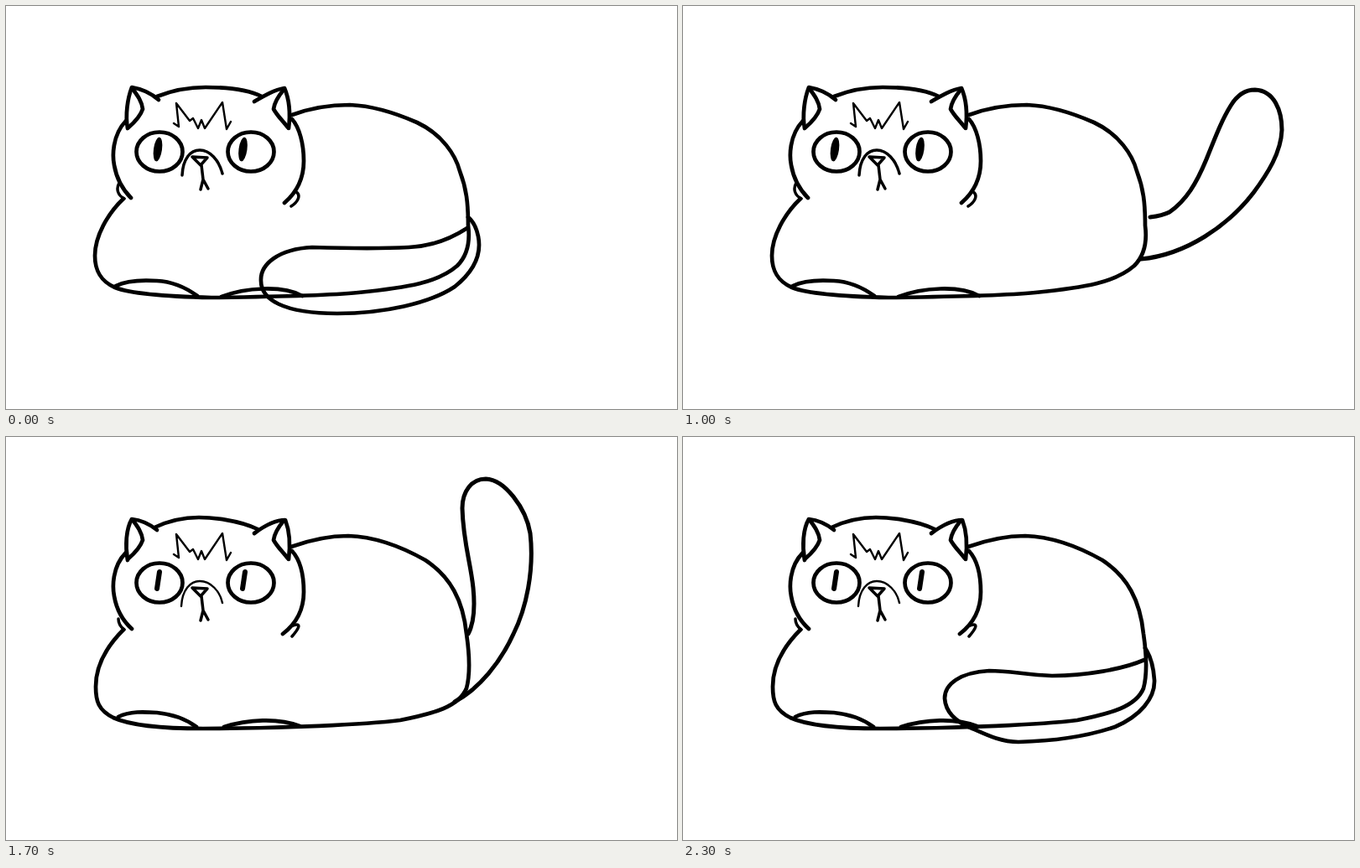
An HTML page for the animation above (2400 ms loop, 800 by 481 pixels).

```html
<!DOCTYPE html>
<html lang="en">
<head>
<meta charset="utf-8">
<title>Cat wagging its tail</title>
<style>
  html, body { margin: 0; width: 100%; height: 100%; overflow: hidden; background: #fff; }
  svg { display: block; width: 100%; height: 100%; }
  .ink { fill: none; stroke: #000; stroke-width: 4.7; stroke-linecap: round; stroke-linejoin: round; }
  .mid { stroke-width: 3.5; }
  .thin { stroke-width: 2.4; }
  .bold { stroke-width: 5; }
  .pupil { stroke-width: 6; }
  .solid { fill: #000; stroke: none; }

  /* Two line drawings swap every 100 ms */
  .boil-a { animation: boil-a .2s step-end infinite; }
  .boil-b { animation: boil-b .2s step-end infinite; }
  @keyframes boil-a { 0% { visibility: visible } 50%, 100% { visibility: hidden } }
  @keyframes boil-b { 0% { visibility: hidden } 50%, 100% { visibility: visible } }

  /* The tail sweeps from curled to upright and back, 24 steps per loop */
  .tail path { visibility: hidden; animation: 2.4s step-end infinite; }
  .tail .curl { animation-name: curl; }
  .tail .loosen { animation-name: loosen; }
  .tail .hang { animation-name: hang; }
  .tail .reach { animation-name: reach; }
  .tail .lift { animation-name: lift; }
  .tail .rise { animation-name: rise; }
  .tail .upright { animation-name: upright; }
  @keyframes curl { 0% { visibility: visible } 29.166%, 100% { visibility: hidden } }
  @keyframes loosen {
    0%, 33.333%, 100% { visibility: hidden }
    29.166%, 95.833% { visibility: visible }
  }
  @keyframes hang {
    0%, 37.5%, 95.833%, 100% { visibility: hidden }
    33.333%, 91.666% { visibility: visible }
  }
  @keyframes reach {
    0%, 41.666%, 91.666%, 100% { visibility: hidden }
    37.5%, 87.5% { visibility: visible }
  }
  @keyframes lift {
    0%, 45.833%, 87.5%, 100% { visibility: hidden }
    41.666%, 83.333% { visibility: visible }
  }
  @keyframes rise {
    0%, 50%, 83.333%, 100% { visibility: hidden }
    45.833%, 79.166% { visibility: visible }
  }
  @keyframes upright {
    0%, 79.166%, 100% { visibility: hidden }
    50% { visibility: visible }
  }
</style>
</head>
<body>
<svg viewBox="0 0 800 481" preserveAspectRatio="none">
  <g class="ink tail">
    <path class="curl" d="M550 265C530 278 505 287 480 288C440 290 400 289 365 288C325 290 303 308 304 328C304 350 330 367 395 367C450 367 505 355 535 335C560 315 567 295 563 275C561 265 557 257 551 252"/>
    <path class="loosen" d="M550 266C525 277 480 285 440 285C410 284 390 279 365 279C330 281 312 295 312 312C313 328 325 340 345 348C365 357 380 364 400 364C440 363 480 358 515 346C545 333 563 312 562 290C561 275 558 262 551 252"/>
    <path class="hang" d="M552 250C570 285 600 308 628 335C655 362 672 385 670 405C667 425 650 432 632 431C595 426 560 390 545 365C535 345 532 335 533 315"/>
    <path class="reach" d="M551 243C582 276 630 300 692 310C715 314 738 313 757 317C775 322 785 333 784 347C780 370 755 383 715 384C640 383 575 348 547 302"/>
    <path class="lift bold" d="M557 252C565 251 572 250 580 246C600 232 612 212 624 183C636 153 643 135 653 119C662 104 672 100 682 100C705 101 714 125 714 148C713 175 697 200 680 223C650 262 600 297 546 302"/>
    <path class="rise bold" d="M554 246C568 240 578 226 584 208C592 180 590 140 600 100C606 75 620 64 635 65C662 68 676 105 675 140C672 190 650 225 630 250C605 282 575 302 542 309"/>
    <path class="upright bold" d="M551 235C558 222 559 200 557 180C554 150 545 125 544 85C544 65 555 50 572 50C595 51 620 85 625 115C630 160 620 205 605 235C590 268 565 300 535 316"/>
  </g>

  <g class="ink boil-a">
    <path d="M341 130C365 121 390 118 410 118C435 119 465 128 490 139C520 153 536 178 541 197C549 218 551 235 551 262C554 285 548 300 538 310C515 330 480 336 420 342C390 345 320 347 245 348C200 347 150 344 130 336C112 328 106 315 106 298C106 275 121 248 140 230"/>
    <path d="M131 334C145 327 165 327 180 328C202 329 217 338 228 346M257 347C285 336 330 333 353 346"/>
    <path d="M180 108C205 98 225 97 238 97S285 98 305 108"/>
    <path d="M145 146C142 130 145 110 150 97C162 99 173 104 182 112"/>
    <path d="M296 114C308 107 320 100 332 98C338 112 339 130 337 146"/>
    <path d="M143 137C126 155 127 180 129 190C132 207 140 220 149 229M341 135C350 145 355 165 355 185C355 205 347 222 332 235"/>
    <path class="mid" d="M135 211C131 218 133 226 141 230M346 222C352 226 348 234 340 239"/>
    <path class="mid" d="M210 202C211 182 220 172 231 172C243 172 254 184 258 200"/>
    <ellipse class="solid" cx="181" cy="171" rx="5" ry="14.5" transform="rotate(8 181 171)"/>
    <ellipse class="solid" cx="282.5" cy="171" rx="5" ry="14.5" transform="rotate(8 282.5 171)"/>
  </g>

  <g class="ink boil-b">
    <path d="M340 131C365 122 390 118 408 118C440 119 470 130 500 147C530 167 545 195 549 235C553 262 553 285 549 300C540 322 510 330 470 338C430 343 330 348 235 348C190 348 150 345 128 335C110 326 107 315 107 298C107 272 122 248 140 230"/>
    <path d="M134 334C147 327 165 328 180 329C200 331 215 337 227 346M260 346C288 337 325 335 350 345"/>
    <path d="M177 108C198 98 215 96 230 96S277 99 300 110"/>
    <path d="M145 147C142 130 143 110 150 98C160 99 170 103 180 111"/>
    <path d="M296 115C308 106 320 99 333 99C338 112 339 130 337 146"/>
    <path d="M143 138C126 155 127 180 129 190C132 207 140 220 150 229M341 136C351 147 355 166 355 185C355 205 347 222 330 235"/>
    <path class="mid" d="M134 217C134 223 137 227 141 230M342 225C354 221 348 230 341 238"/>
    <path class="thin" d="M209 202C210 182 220 172 231 172C244 172 255 184 258 198"/>
    <path class="pupil" d="M183 161L180 181M285 161L282 181"/>
  </g>

  <g class="ink">
    <path d="M151 99C157 107 162 114 163 123C160 132 153 139 146 145M331 100C326 106 320 115 319 123C324 132 331 138 336 145"/>
    <ellipse cx="183" cy="174" rx="27.5" ry="23.5"/>
    <ellipse cx="292" cy="174" rx="27.5" ry="23.5"/>
    <path class="mid" d="M222 180L240 181L232 190ZM233 190L235 207L232 219M235 207L241 218"/>
    <path class="thin" d="M200 140L206 144L203 116L219 137L223 134L229 146L233 136L237 146L258 115L263 147L268 138"/>
  </g>
</svg>
</body>
</html>
```
